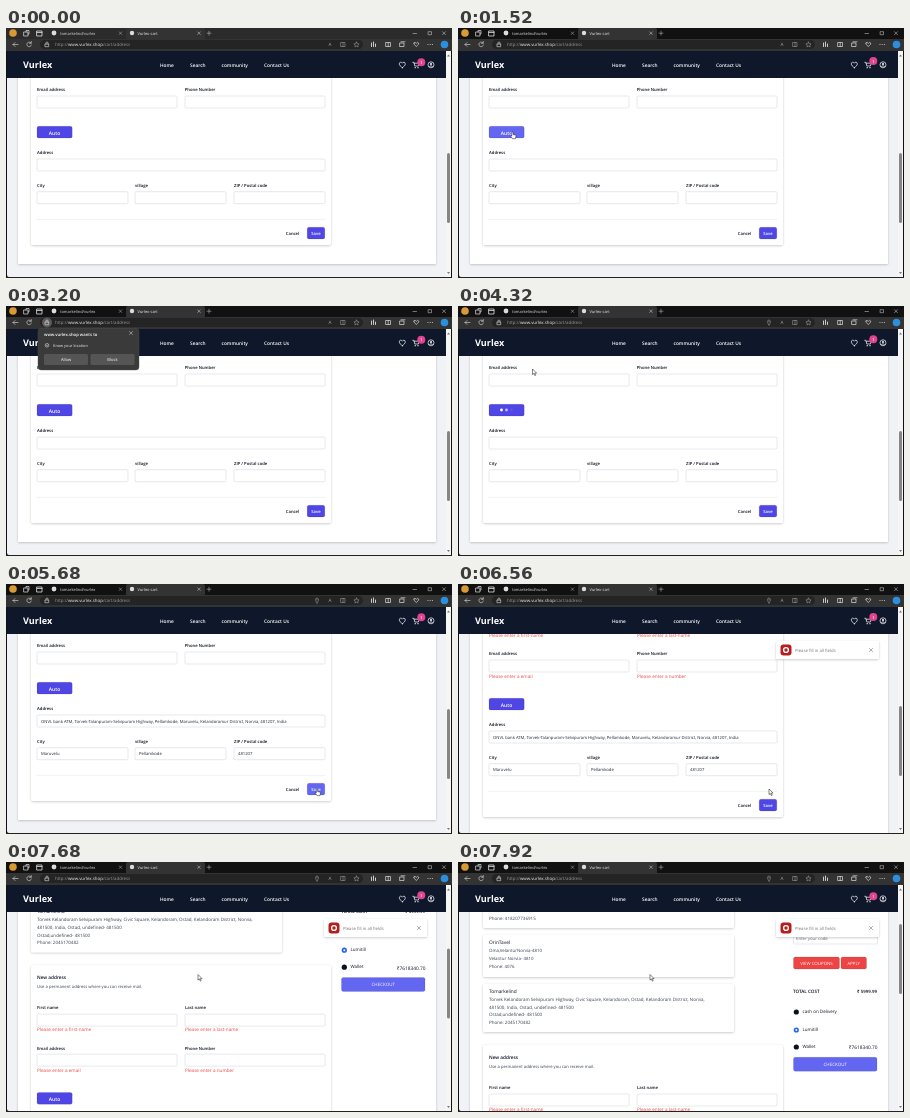
Write an HTML page that moves like this. It is 446 px wide and 250 px high and loops after 8 s.

```html
<!DOCTYPE html>
<html lang="en">
<head>
<meta charset="utf-8">
<title>Address form</title>
<style>
  html, body { margin: 0; width: 100%; height: 100%; overflow: hidden; background: #111; }
  svg { display: block; width: 446px; height: 250px; }
  text { font-family: "Open Sans", "Noto Sans", sans-serif; text-rendering: geometricPrecision; white-space: pre; }
</style>
</head>
<body>
<svg id="stage" viewBox="0 0 446 250"></svg>
<script>
const LOOP = 8000;
const INK = '#0b111e', GREY = '#374151', INDIGO = '#4f46e5', INDIGO_LIGHT = '#6366f1', RED = '#ef4444';

// Markup helpers; text is placed by its vertical centre.
const text = (x, y, s, size = 4.2, fill = INK, weight = 400, anchor = 'start') =>
  `<text x="${x}" y="${y + size * 0.4}" font-size="${size}" fill="${fill}" font-weight="${weight}" text-anchor="${anchor}">${s}</text>`;
const rect = (x, y, w, h, fill, r = 0, more = '') =>
  `<rect x="${x}" y="${y}" width="${w}" height="${h}" rx="${r}" fill="${fill}" ${more}/>`;
const dot = (x, y, r, fill, more = '') => `<circle cx="${x}" cy="${y}" r="${r}" fill="${fill}" ${more}/>`;
const line = (d, color, w = 0.7) =>
  `<path d="${d}" fill="none" stroke="${color}" stroke-width="${w}" stroke-linecap="round" stroke-linejoin="round"/>`;
const cross = (x, y, r, color, w) => line(`M${x - r} ${y - r}l${2 * r} ${2 * r}m0 ${-2 * r}l${-2 * r} ${2 * r}`, color, w);
const group = (id, ...parts) => `<g id="${id}">${parts.join('')}</g>`;
const label = (x, y, s) => text(x, y, s, 4.2, INK, 600);
const value = (x, y, s) => text(x, y, s, 4.2, '#1f2937');
const field = (x, y, w) => rect(x, y, w, 12, '#fff', 1.2, 'stroke="#cdd1d8" stroke-width=".5"');
const card = (x, y, w, h) => rect(x, y, w, h, '#fff', 2, 'filter="url(#shadow)"');
const button = (id, x, y, w, h, s, size, fill = INDIGO, weight = 600) =>
  rect(x, y, w, h, fill, 1.7, `id="${id}" stroke="#0003" stroke-width=".5"`) +
  text(x + w / 2, y + h / 2, s, size, '#fff', weight, 'middle');
const warn = (x, y, s) => text(x, y, s, 4.65, RED);

const tabs = [
  rect(0, 0, 446, 23, '#111', 0, 'id="strip"'),
  rect(120, 0, 79, 12, '#333', 2),
  rect(0, 11, 446, 12, '#333'),
  rect(34, 12, 323, 9, '#242424', 4.5),
  dot(7, 5, 3.8, '#d99a35'),
  line('M18 4h4v4h-4zM20 4V2.500h3V6h-1', '#ddd', 0.7),
  line('M31 3h5v5h-5zM31 4.500h5', '#ddd', 0.8),
  dot(48, 5, 2.4, '#ddd'),
  text(54, 5, 'tomarkelind/vurlex', 4, '#ddd'),
  cross(114.500, 5.2, 1.3, '#bbb', 0.5),
  dot(126, 5, 2.2, '#ddd'),
  text(131.500, 5, 'Vurlex-cart', 4, '#eee'),
  cross(193, 5.2, 1.3, '#ddd', 0.5),
  line('M201 5.200h4m-2-2v4', '#ccc', 0.5),
  line('M407 5.500h3.500M422.500 3.700h3v3h-3z', '#ddd', 0.5),
  cross(438, 5.2, 1.5, '#ddd', 0.5),
  line('M12 16.500H7m2-2-2 2 2 2', '#ddd', 0.6),
  line('M25 15a2.300 2.300 0 1 0 .4 2M25.300 13.500V15.300H23.500', '#ddd', 0.6),
  dot(41, 16.5, 5, '#5a5a5a', 'id="lockGlow"'),
  line('M39.300 16h3.400v2.700h-3.400zM40 16v-1a1 1 0 0 1 2 0v1', '#ddd', 0.6),
  `<text x="49" y="18" font-size="4.4" fill="#999">http://<tspan fill="#eee">www.vurlex.shop</tspan>/cart/address</text>`,
  group('pin', line('M311 19c-2.200-2.600-1.800-5 0-5s2.200 2.400 0 5z', '#aaa', 0.5), dot(311, 15.700, 0.5, '#aaa')),
  text(324, 16.5, 'A', 4.6, '#aaa', 400, 'middle'),
  line('M335 14.500h4v4h-4zM337 14.500v4', '#aaa', 0.5),
  line('M350.500 14l.8 1.700 1.800.2-1.300 1.300.3 1.800-1.600-.9-1.600.9.3-1.800-1.300-1.300 1.800-.2z', '#aaa', 0.5),
  line('M365.500 15v3.500M367.500 14v4.500M369.500 16v2.500', '#ddd', 0.9),
  line('M380 14.500h4.500v4H380zM382.200 14.500v4', '#ddd', 0.7),
  line('M394 15h4v3.500h-4zM395 13.800h4', '#ddd', 0.7),
  line('M408 15c1-1.500 2 0 2.300.4.300-.4 1.300-1.900 2.300-.4.500 1-1 2.500-2.300 3.500-1.300-1-2.800-2.500-2.300-3.500z', '#ddd', 0.7),
  dot(422, 16.5, 0.5, '#ddd') + dot(424.2, 16.5, 0.5, '#ddd') + dot(426.4, 16.5, 0.5, '#ddd'),
  dot(438.500, 16.5, 3.8, '#2b8fe0')
].join('');

const nav = [
  rect(1, 23, 439, 27, '#0f172a'),
  text(17, 36.700, 'Vurlex', 9.1, '#fff', 700),
  ...[[154, 'Home'], [184, 'Search'], [215.5, 'community'], [258, 'Contact Us']]
    .map(([x, s]) => text(x, 36.800, s, 4.8, '#fff', 600)),
  line('M396.300 39.700c-1.800-1.300-3-2.500-3-3.800 0-2 2.300-2.300 3-.7.700-1.600 3-1.300 3 .7 0 1.300-1.200 2.500-3 3.800z', '#fff', 0.7),
  line('M406.800 34.300h1.100l.9 3.700h3.600l.8-2.800h-5', '#fff', 0.7),
  dot(409.2, 39.7, 0.65, '#fff') + dot(412, 39.7, 0.65, '#fff'),
  dot(425, 36.8, 3, 'none', 'stroke="#fff" stroke-width=".7"'),
  dot(425, 35.900, 1, '#fff') + line('M423.500 38.600c.5-1.200 2.500-1.200 3 0', '#fff', 0.7),
  group('badge', dot(415.300, 0, 4, '#e0438f'), text(415.300, 0, '1', 3.8, '#fff', 600, 'middle'))
].join('');

// Saved addresses and the order summary sit above the first view.
const above = [
  card(25, -180, 251, 50),
  text(31, -140, 'Phone: 418207736915', 4.5, GREY),
  card(25, -123, 251, 42),
  text(31, -115.500, 'OrinTavel', 4.8, INK, 500),
  ...['Oma,VelanturNorvia-4810', 'Velantur Norvia- 4810', 'Phone: 4076'].map((s, i) => text(31, -107.500 + i * 8, s, 4.4, GREY)),
  card(25, -74, 251, 48),
  text(31, -67, 'Tomarkelind', 4.8, INK, 500),
  ...['Torvek Kelandoram Selvipuram Highway, Civic Square, Kelandoram, Ostad, Kelandoram District, Norvia,',
    '481500, India, Ostad, undefined- 481500', 'Ostad,undefined- 481500', 'Phone: 2045170482']
    .map((s, i) => text(31, -59 + i * 7.8, s, 4.5, GREY)),

  field(335.500, -126, 84) + text(338, -120, 'Enter your code', 4.3, '#6b7280'),
  button('view', 335.500, -101, 46, 12, 'VIEW COUPONS', 4.4, RED, 500),
  button('apply', 383, -101, 25.5, 12, 'APPLY', 4.4, RED, 500),
  text(335, -67, 'TOTAL COST', 4.6, INK, 600),
  text(419, -67, '₹ 5999.99', 4.4, INK, 600, 'end'),
  ...[['cash on Delivery', -46.5, INK], ['Lumitill', -28.5, '#2563eb'], ['Wallet', -11.5, INK]].map(([s, y, c]) =>
    dot(338.300, y + 0.5, 2.6, c) + (c === INK ? '' : dot(338.300, y + 0.5, 1, '#fff')) + text(344.500, y, s, 4.5, INK, 500)),
  text(419.500, -10.500, '₹7618340.70', 4.8, INK, 500, 'end'),
  button('checkout', 335.500, -0.7, 83.5, 14, 'CHECKOUT', 4.5, INDIGO_LIGHT, 500)
].join('');

const form = [
  text(31, -1, 'New address', 4.7, INK, 600),
  text(31, 8, 'Use a permanent address where you can receive mail.', 4.2, GREY),
  label(31, 29, 'First name') + label(179, 29, 'Last name'),
  field(31, 36, 140) + field(179, 36, 140),
  group('warnings',
    warn(31, 51, 'Please enter a first-name'), warn(179, 51, 'Please enter a last-name'),
    warn(31, 92, 'Please enter a email'), warn(179, 92, 'Please enter a number')),
  group('contact',
    label(31, 61.800, 'Email address'), label(178.700, 61.800, 'Phone Number'),
    field(31, 68, 140), field(179, 68, 140)),
  group('place',
    rect(31, 98.3, 35.2, 11.8, INDIGO, 1.7, 'id="auto" stroke="#0003" stroke-width=".5"'),
    group('autoText', text(48.500, 104.700, 'Auto', 5, '#fff', 600, 'middle')),
    group('loader', dot(43.500, 104, 1.4, '#fff'), dot(48.500, 104, 1.4, '#fff'), dot(53.500, 104, 1.4, '#fff')),
    label(31, 124.800, 'Address'), field(31, 131, 288),
    label(31, 157, 'City'), field(31, 163.7, 91),
    label(129, 157, 'village'), field(129, 163.7, 91),
    label(228, 157, 'ZIP / Postal code'), field(228, 163.7, 91),
    group('filled',
      value(35, 137, 'ONVL bank ATM, Torvek-Talanpuram-Selvipuram Highway, Pellamkode, Maruvelu, Kelandoramur District, Norvia, 481207, India'),
      value(35, 169.500, 'Maruvelu'), value(133, 169.500, 'Pellamkode'), value(232, 169.500, '481207')),
    line('M31 191.300H319', '#e5e7eb', 0.6),
    text(286.500, 205, 'Cancel', 4.2, INK, 600, 'middle'),
    button('save', 301.2, 199.2, 17.6, 11.8, 'Save', 4.2))
].join('');

const popup = group('popup',
  rect(32, 22.500, 101, 41.500, '#3a3a3a', 3, 'stroke="#555" stroke-width=".4"'),
  text(38, 28.700, 'www.vurlex.shop wants to', 4.2, '#fff', 600),
  cross(125, 27, 1.5, '#ddd', 0.5),
  dot(41, 39.3, 1.8, 'none', 'stroke="#ddd" stroke-width=".6"') + dot(41, 39.3, 0.6, '#ddd'),
  text(47, 39.500, 'Know your location', 3.9, '#eee'),
  rect(38, 48, 44, 11, '#555', 1.5) + text(60, 53.500, 'Allow', 4.1, '#fff', 400, 'middle'),
  rect(84.500, 48, 44, 11, '#555', 1.5) + text(106.500, 53.500, 'Block', 4.1, '#fff', 400, 'middle'));

const toast = group('toast',
  rect(318, 57, 103, 18, '#fff', 1.5, 'filter="url(#shadow)"'),
  rect(322.500, 60.500, 11, 11, '#b91c1c', 3),
  dot(328, 66, 2.4, 'none', 'stroke="#fff" stroke-width="1.4"'),
  text(337, 66, 'Please fill in all fields', 4.25, '#757575'),
  cross(413, 66, 1.6, '#777', 0.6));

const stage = document.getElementById('stage');
stage.innerHTML = `
  <defs><filter id="shadow" x="-5%" y="-20%" width="110%" height="140%">
    <feDropShadow dx="0" dy=".8" stdDeviation="1" flood-opacity=".22"/></filter></defs>
  ${rect(0, 0, 446, 250, '#111')}
  ${rect(1, 23, 444, 226, '#f1f2f5', 2)}
  ${group('page',
    rect(12, -300, 418, 536, '#fff', 1, 'id="sheet" filter="url(#shadow)"'),
    rect(25, -13, 300, 230, '#fff', 2, 'id="formCard" filter="url(#shadow)"'),
    above, form)}
  ${nav}
  ${rect(440, 23, 5, 226, '#f5f5f5')}
  <path d="M441 28.500l1.500-2 1.500 2zM441 244l1.500 2 1.500-2z" fill="#777"/>
  ${rect(441, 0, 3, 70, '#858585', 1.5, 'id="thumb"')}
  ${rect(0, 249, 446, 1, '#222')}
  ${toast}${tabs}
  ${group('cursor',
    '<path id="arrow" d="M0 0v5.600l1.300-1.200 1 2.200.9-.4-1-2.100h1.900z" fill="#fff" stroke="#111" stroke-width=".5"/>',
    '<path id="hand" d="M-.7 .4Q0-.6 .6 .4V2.500L3 3.100Q3.600 3.300 3.500 4L3 6.700H.2L-2 4.100Q-1.800 3.200-.7 3.900z" fill="#fff" stroke="#111" stroke-width=".5"/>')}
  ${popup}`;

const el = {};
stage.querySelectorAll('[id]').forEach(node => el[node.id] = node);

const clamp = v => Math.max(0, Math.min(1, v));
const smooth = v => v * v * (3 - 2 * v);
const progress = (t, a, b) => clamp((t - a) / (b - a));
const show = (node, on) => node.setAttribute('visibility', on ? 'visible' : 'hidden');
const move = (node, x, y) => node.setAttribute('transform', `translate(${x} ${y})`);

// Pointer stops: time, x, y. It rests under the permission popup.
const path = [
  [0, -8, 203], [80, -6, 203], [960, 20, 111], [1280, 54.500, 104], [1680, 54.500, 104], [2320, 70, 54],
  [3520, 70, 54], [3840, 74.500, 63], [4400, 74.500, 63], [5200, 311, 205], [6560, 311, 205],
  [7280, 192, 112.500], [LOOP, 192, 112.500]
];
function pointer(t) {
  const i = path.findIndex(p => p[0] > t);
  const [ta, xa, ya] = path[i - 1], [tb, xb, yb] = path[i];
  const k = smooth(progress(t, ta, tb));
  return [xa + (xb - xa) * k, ya + (yb - ya) * k];
}

function draw(t) {
  const failed = t >= 5760, asking = t >= 1840 && t < 3520, loading = t >= 3600 && t < 4800;
  const scroll = 196 * smooth(progress(t, 7400, 7900));
  const grow = failed ? 8 : 0;
  const [x, y] = pointer(t);
  const over = (left, top, w) => x > left && x < left + w && y > top && y < top + 12;
  const onAuto = over(31, 98 + 2 * grow, 35.5), onSave = over(301, 199 + 2 * grow, 18);

  // The window takes focus shortly after the start.
  el.strip.setAttribute('fill', t < 400 ? '#2b2b2b' : '#111');
  move(el.page, 0, scroll);
  move(el.contact, 0, grow);
  move(el.place, 0, 2 * grow);
  el.sheet.setAttribute('height', 536 + 2 * grow);
  el.formCard.setAttribute('height', 230 + 2 * grow);
  el.thumb.setAttribute('y', (failed ? 122 : 125) - 60 * scroll / 196);
  show(el.warnings, failed);

  show(el.autoText, !loading);
  show(el.loader, loading);
  [...el.loader.children].forEach((d, i) =>
    d.setAttribute('opacity', 0.5 + 0.5 * Math.cos((t - 4320) / 160 - i * 1.3)));
  show(el.filled, t >= 4800);
  el.auto.setAttribute('fill', onAuto ? INDIGO_LIGHT : INDIGO);
  el.save.setAttribute('fill', onSave ? INDIGO_LIGHT : INDIGO);

  show(el.popup, asking);
  show(el.lockGlow, asking);
  show(el.pin, t >= 3520);
  show(el.toast, failed);
  move(el.toast, 135 * (1 - progress(t, 5800, 6300)) ** 3, 0);
  move(el.badge, 0, 34.2 - 1.2 * Math.sin(Math.PI * t / 1000) ** 2);

  move(el.cursor, x, y);
  show(el.hand, onAuto || onSave);
  show(el.arrow, !(onAuto || onSave));
}

const start = performance.now();
(function tick() {
  draw((performance.now() - start) % LOOP);
  requestAnimationFrame(tick);
})();
</script>
</body>
</html>
```
